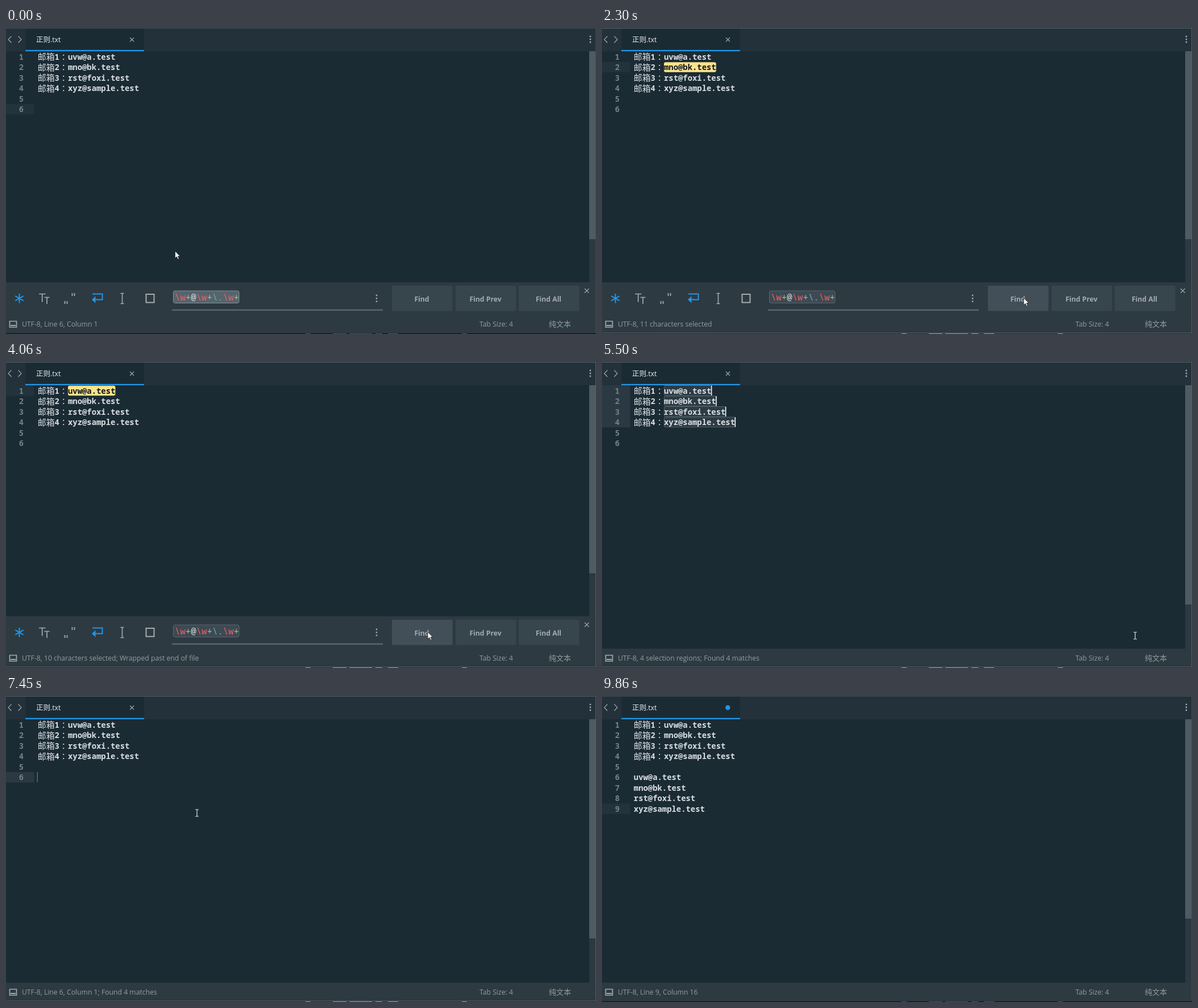
These frames come from a looping animation (1038 px wide and 539 px high, 9960 ms). An HTML page with a canvas:

```html
<!DOCTYPE html>
<html lang="zh-CN">
<head>
<meta charset="utf-8">
<style>
html, body { margin: 0; width: 100%; height: 100%; overflow: hidden; background: #1b2b34; }
canvas { display: block; }
</style>
</head>
<body>
<canvas id="stage" width="1038" height="539"></canvas>
<script>
const c = document.getElementById('stage').getContext('2d');
const LOOP = 9960, FOCUS = 1420, FIND_ALL = 5380, CLICK = 7170, PASTE = 8200, BLUR = 9860;
const MONO = '"Noto Sans Mono", "DejaVu Sans Mono", monospace';
const UI = '"Open Sans", "Noto Sans", sans-serif';
const CJK = '"Noto Sans CJK SC", "Noto Sans CJK", sans-serif';
const BG = '#1b2b34', PANEL = '#2d3a42', GREY = '#a3abaf', DIM = '#929ca1', BLUE = '#2196e8', PALE = '#d8dee3';
const ROW = 18.55, CHAR = 8.34;
const mails = ['uvw@a.test', 'mno@bk.test', 'rst@foxi.test', 'xyz@sample.test'];

// [start, selected row] for each press of Find
const finds = [[1540, 0], [2170, 1], [2790, 2], [3540, 3], [3920, 0]];
const fieldCaret = [[1420, 1900], [2540, 2920], [3540, 4060], [4550, 5000]];
const path = [
  [0, 297.5, 393], [120, 297.5, 393], [400, 400, 333], [1010, 742, 475.5], [4430, 742, 475.5],
  [4800, 850, 488], [5100, 938, 482], [6020, 938, 482], [6280, 846, 440], [7050, 336, 206],
  [8700, 336, 206], [9500, 940, 521], [LOOP, 940, 521]
];
const buttons = [['Find', 679], ['Find Prev', 791], ['Find All', 902]];

const rowTop = i => 41 + i * ROW;

function rect(x, y, w, h, color) {
  c.fillStyle = color;
  c.fillRect(x, y, w, h);
}

function text(s, x, y, font, color, align = 'left') {
  c.font = font;
  c.fillStyle = color;
  c.textAlign = align;
  c.fillText(s, x, y);
}

function round(x, y, w, h, r, fill, stroke) {
  c.beginPath();
  c.roundRect(x, y, w, h, r);
  c.fillStyle = fill;
  c.fill();
  if (stroke) {
    c.strokeStyle = stroke;
    c.lineWidth = 1;
    c.stroke();
  }
}

function line(d, color, width) {
  c.strokeStyle = color;
  c.lineWidth = width;
  c.stroke(new Path2D(d));
}

function dot(x, y, r, color) {
  c.fillStyle = color;
  c.beginPath();
  c.arc(x, y, r, 0, 7);
  c.fill();
}

function blink(dt) {
  return Math.max(0, Math.min(1, .5 + 2.2 * Math.cos(2 * Math.PI * dt / 1060)));
}

function caret(x, row, alpha) {
  c.globalAlpha = alpha;
  rect(x, rowTop(row) + .5, 1.5, 17.5, '#f4f6f7');
  c.globalAlpha = 1;
}

function mouseAt(t) {
  const i = path.findIndex(p => p[0] > t);
  const [t0, x0, y0] = path[i - 1], [t1, x1, y1] = path[i];
  const k = (t - t0) / (t1 - t0);
  return [x0 + (x1 - x0) * k, y0 + (y1 - y0) * k];
}

function drawTabs(pasted) {
  rect(0, 0, 1038, 41, '#23313a');
  rect(34, 1, 209, 40, BG);
  rect(34, 38.7, 209, 2.3, BLUE);
  line('M9.5 14.5 4 20.2 9.5 26M21.5 14.5 27 20.2 21.5 26', GREY, 1.2);
  text('正则', 53, 25, '12.5px ' + CJK, '#eceff1');
  text('.txt', 78, 25, '12.3px ' + UI, '#eceff1');
  if (pasted) dot(221.3, 20.5, 4.2, BLUE);
  else line('M218 17 225 24M225 17 218 24', GREY, 1.1);
  for (const y of [15, 20, 25]) dot(1028, y, 1.4, GREY);
}

function drawEditor(t, found) {
  const pasted = t >= PASTE, all = t >= FIND_ALL && t < CLICK;
  const active = found ? found[1] : pasted ? 8 : 5;
  if (all) rect(0, 41, 49.5, ROW * 4, '#2a3942');
  else rect(0, rowTop(active), 49.5, ROW, t >= CLICK && t < BLUR ? '#2a3942' : '#23333b');

  const font = '600 13.9px ' + MONO;
  for (let i = 0; i < (pasted ? 9 : 6); i++)
    text(i + 1, 31, rowTop(i) + 14.6, font, '#758188', 'right');

  mails.forEach((mail, i) => {
    const y = rowTop(i), w = mail.length * CHAR, hit = found && found[1] === i;
    if (hit) round(109, y + .8, w, 17.4, 3, '#fce28c');
    if (all) round(109.5, y + .5, w - 1, ROW - 1, 2, '#2c3b44', '#56636b');
    text('邮箱', 55.8, y + 15.2, '14.9px ' + CJK, PALE);
    text(i + 1, 85.5, y + 14.6, font, PALE);
    text('：', 97.5, y + 14.6, '14.9px ' + CJK, PALE);
    text(mail, 109, y + 14.6, font, hit ? '#10181c' : PALE);
    if (pasted) text(mail, 55.8, rowTop(i + 5) + 14.6, font, PALE);
    if (all) caret(108.5 + w, i, blink(t - 5700));
  });
  if (t >= CLICK && !pasted) caret(54.5, 5, blink(t - CLICK));
  if (pasted && t < BLUR) caret(55.5 + 15 * CHAR, 8, blink(t - PASTE));
}

function drawScroll(t) {
  const open = t < FIND_ALL, end = open ? 372 : t < PASTE ? 427 : 392;
  rect(1026, 41, 12, 464, '#2b3941');
  rect(1026, 41, 12, end - 41, '#4f5b62');
}

function drawField(t) {
  if (t < FOCUS) round(294.5, 463, 115.5, 21.5, 3, '#56646c', '#84919a');
  else round(294.5, 463, 115.5, 21.5, 3, '#3d4a53', '#59666e');
  const parts = [['\\w', '#ec5f66'], ['+', '#99c794'], ['@', PALE], ['\\w', '#ec5f66'],
    ['+', '#99c794'], ['\\.', '#5fb4b4'], ['\\w', '#ec5f66'], ['+', '#99c794']];
  let x = 297;
  for (const [s, color] of parts) {
    text(s, x, 479.5, '500 15.7px ' + MONO, color);
    x += s.length * 9.42;
  }
  if (fieldCaret.some(([a, b]) => t >= a && t < b)) rect(409.5, 463, 1.5, 21, '#fff');
  rect(292, 495.5, 371, 2.5, '#59656c');
  for (const y of [471, 476.3, 481.6]) dot(652, y, 1.4, GREY);
}

function drawPanel(t, [mx, my]) {
  rect(0, 448, 1038, 57, PANEL);
  line('M23.5 468V484.5M16.3 472.1 30.7 480.4M30.7 472.1 16.3 480.4', BLUE, 2);
  line('M58 468.5H69.5M63.7 468.5V482.5M67.5 474.5H76.5M72 474.5V486', GREY, 1.7);
  line('M103.5 481V486M107.5 481V486M116.5 467V472M120.5 467V472', GREY, 1.8);
  line('M152 468.5H169.5V478.5H154', BLUE, 2);
  c.fillStyle = BLUE;
  c.fill(new Path2D('M151 478.5 157.5 472.5V484.5Z'));
  line('M204.5 467.5V485.5M201.5 467.5H207.5M201.5 485.5H207.5', GREY, 1.6);
  line('M246.5 469H260.5V483.5H246.5Z', GREY, 2);
  drawField(t);
  for (const [label, x] of buttons) {
    const hover = mx >= x && mx < x + 106 && my > 454 && my < 498;
    round(x, 454, 106.5, 44.5, 1, hover ? '#424f58' : '#37454d');
    text(label, x + 52.5, 481.5, 'bold 12.2px ' + UI, GREY, 'center');
  }
  line('M1018 459 1025.5 466.5M1025.5 459 1018 466.5', GREY, 1.1);
}

function status(t, found) {
  if (found) return mails[found[1]].length + ' characters selected' +
    (found[0] === 3920 ? '; Wrapped past end of file' : '');
  if (t < FIND_ALL) return 'Line 6, Column 1';
  if (t < CLICK) return '4 selection regions; Found 4 matches';
  const place = t < PASTE ? 'Line 6, Column 1' : 'Line 9, Column 16';
  return place + (t < 9100 ? '; Found 4 matches' : '');
}

function drawStatus(t, found) {
  rect(0, 505, 1038, 34, PANEL);
  line('M6.5 516.5H18.5V527H6.5Z', GREY, 1.7);
  line('M8 524H17', GREY, 2);
  const font = '12.2px ' + UI;
  text('UTF-8, ' + status(t, found), 28, 526.3, font, DIM);
  text('Tab Size: 4', 833, 526.3, font, DIM);
  text('纯文本', 955, 526.3, '13px ' + CJK, DIM);
}

function drawEdges(focused) {
  const edge = focused ? '#53616a' : '#3d4b53';
  rect(0, 0, 1038, 1, edge);
  rect(1037, 0, 1, 539, edge);
  rect(0, 537, 1038, 1, focused ? '#647178' : '#26323a');
  rect(0, 538, 1038, 1, '#0c1216');
  const tint = focused ? '#75837a' : '#5f4f42';
  for (const [x, w] of [[527, 9], [575, 24], [604, 40], [650, 12], [672, 18], [802, 9]])
    rect(x, 538, w, 1, tint);
}

function drawMouse(t, [x, y]) {
  if (t >= BLUR) return;
  if (t >= FIND_ALL) {
    line(`M${x - 3} ${y - 6}h6m-3 0v12m-3 0h6`, '#dfe3e5', 1.2);
    return;
  }
  const arrow = new Path2D(`M${x} ${y}v12.5l2.9 -2.7 2 4.6 2 -.9 -2 -4.4h3.9z`);
  c.fillStyle = '#fff';
  c.fill(arrow);
  c.strokeStyle = '#111';
  c.lineWidth = .7;
  c.stroke(arrow);
}

function draw(now) {
  const t = now % LOOP, mouse = mouseAt(t);
  const found = t < FIND_ALL ? finds.filter(f => f[0] <= t).pop() : null;
  rect(0, 0, 1038, 539, BG);
  drawTabs(t >= PASTE);
  drawEditor(t, found);
  drawScroll(t);
  if (t < FIND_ALL) drawPanel(t, mouse);
  drawStatus(t, found);
  drawEdges(t >= FOCUS && t < BLUR);
  drawMouse(t, mouse);
}

let start;
function tick(now) {
  start ??= now;
  draw(now - start);
  requestAnimationFrame(tick);
}
requestAnimationFrame(tick);
</script>
</body>
</html>
```
